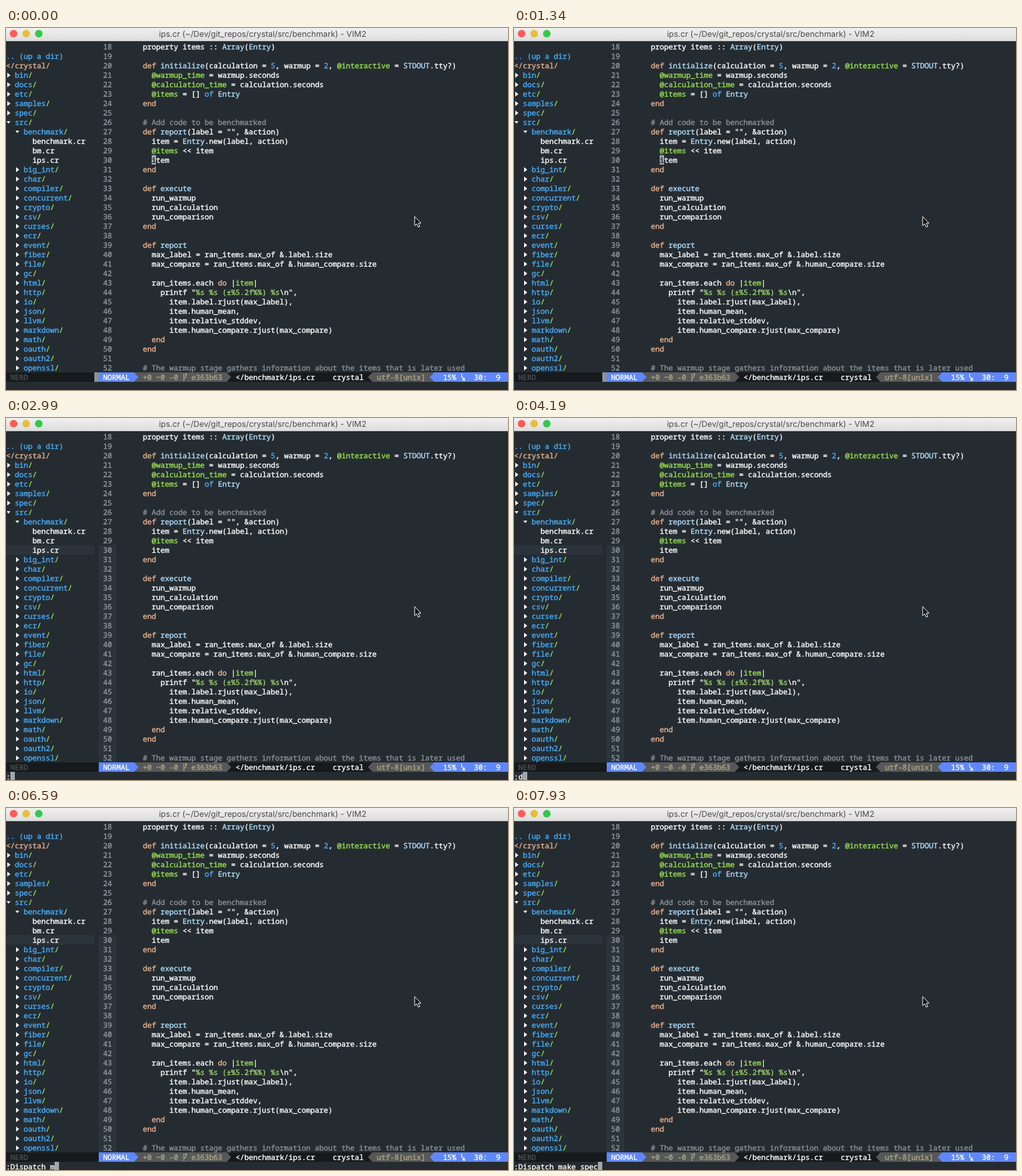
Animation, 796 px wide and 575 px high, one loop 8 s. Source, as an HTML page:

```html
<!DOCTYPE html>
<html lang="en">
<head>
<meta charset="utf-8">
<title>Editor session</title>
<style>
html, body { margin: 0; width: 100%; height: 100%; overflow: hidden; background: #252c31; }
svg { display: block; }
text { white-space: pre; text-rendering: geometricPrecision; }
.m { font: 11.6667px "Noto Sans Mono", monospace; stroke-width: .4; }
.t { font: 12.8px Inter, sans-serif; }
</style>
</head>
<body>
<svg id="stage" width="796" height="575" viewBox="0 0 796 575">
  <defs>
    <linearGradient id="bar" x1="0" y1="0" x2="0" y2="1">
      <stop offset="0" stop-color="#f0f0f0"/>
      <stop offset="1" stop-color="#dcdcdc"/>
    </linearGradient>
  </defs>
</svg>
<script>
const NS = 'http://www.w3.org/2000/svg';
const stage = document.getElementById('stage');
const CW = 7, RH = 15, LOOP = 8000;
const BG = '#252c31', WHITE = '#fcfcfc', BLUE = '#5f87ff', GREY = '#585858', BLACK = '#171a1c';
const INK = {
  w: WHITE, p: '#e8b08c', f: '#b0dcfa', g: '#98e04f', n: '#45adfa',
  c: '#8a8f92', s: '#9cd06f', l: '#8f999f', y: '#aaa684', d: '#4b4f51'
};

function add(tag, attrs, parent = stage) {
  const el = document.createElementNS(NS, tag);
  for (const k in attrs) el.setAttribute(k, attrs[k]);
  return parent.appendChild(el);
}
const rect = (x, y, width, height, fill) => add('rect', { x, y, width, height, fill });
const shape = (d, fill) => add('path', { d, fill });
const rowTop = line => 202 + (line - 30) * RH;

// The thin stroke in the text colour gives the slightly heavy terminal look.
function put(col, line, str, ink = WHITE) {
  const el = add('text', { x: col * CW, y: rowTop(line) + 12, fill: ink, stroke: ink, class: 'm' });
  el.textContent = str;
  return el;
}

// Coloured runs are written {k text}, where k is a key of INK.
function rich(col, line, str) {
  for (const m of str.matchAll(/\{(\w) ([^}]*)\}|[^{]+/g)) {
    const run = m[1] ? m[2] : m[0];
    if (run.trim()) put(col, line, run, INK[m[1] || 'w']);
    col += run.length;
  }
}

// Title bar
rect(0, 0, 796, 575, BG);
rect(0, 0, 796, 21, 'url(#bar)');
rect(0, 20, 796, 1, '#c4c4c4');
['#fc5b57', '#e5bf3c', '#34c84a'].forEach((fill, i) =>
  add('circle', { cx: 12 + i * 20, cy: 9, r: 6, fill }));
add('text', { x: 407, y: 14, 'text-anchor': 'middle', fill: '#4a4a4a', class: 't' })
  .textContent = 'ips.cr (~/Dev/git_repos/crystal/src/benchmark) - VIM2';

// Shading shown while the command line is active
const shade = add('g', { fill: '#2b343a' });
add('rect', { x: 0, y: 202, width: 140, height: 15 }, shade);
add('rect', { x: 147, y: 202, width: 28, height: 345 }, shade);

// File tree
function dir(col, line, name, open) {
  const x = col * CW, y = rowTop(line) + 8;
  shape(open ? `M${x + 1} ${y - 2}h6l-3 4z` : `M${x + 2} ${y - 4}v8l5 -4z`, WHITE);
  rich(col + 2, line, `{n ${name}}{g /}`);
}
rich(0, 19, '{n .. (up a dir)}');
rich(0, 20, '{p </crystal/}');
'bin docs etc samples spec src'.split(' ').forEach((s, i) => dir(0, 21 + i, s, s === 'src'));
dir(2, 27, 'benchmark', true);
['benchmark.cr', 'bm.cr', 'ips.cr'].forEach((s, i) => put(6, 28 + i, s));
('big_int char compiler concurrent crypto csv curses ecr event fiber file gc html http ' +
 'io json llvm markdown math oauth oauth2 openssl')
  .split(' ').forEach((s, i) => dir(2, 31 + i, s));

// Code, first line is 18
const code = `property items :: {f Array}({f Entry})

{p def} {f initialize}(calculation = {n 5}, warmup = {n 2}, {g @interactive} = {f STDOUT}.tty?)
  {g @warmup_time} = warmup.seconds
  {g @calculation_time} = calculation.seconds
  {g @items} = [] {n of} {f Entry}
{p end}

{c # Add code to be benchmarked}
{p def} {f report}(label = "", &action)
  item = {f Entry}.new(label, action)
  {g @items} << item
  item
{p end}

{p def} {f execute}
  run_warmup
  run_calculation
  run_comparison
{p end}

{p def} {f report}
  max_label = ran_items.max_of &.label.size
  max_compare = ran_items.max_of &.human_compare.size

  ran_items.each {p do} |{g item}|
    printf "{s %s %s (±%5.2f%%) %s}\\n",
      item.label.rjust(max_label),
      item.human_mean,
      item.relative_stddev,
      item.human_compare.rjust(max_compare)
  {p end}
{p end}

{c # The warmup stage gathers information about the items that is later used}`;
code.split('\n').forEach((s, i) => {
  put(22, 18 + i, String(18 + i), INK.l);
  rich(31, 18 + i, s);
});

// Status line
const SY = 547, BAR = 53;
const right = (x, ink) => shape(`M${x} ${SY}l7 7.5l-7 7.5z`, ink);
const left = (x, ink) => shape(`M${x + 7} ${SY}l-7 7.5l7 7.5z`, ink);
rect(0, SY, 796, 15, BLACK);
const divider = rect(140, SY, CW, 15, '#8a9299');
rect(147, SY, 56, 15, BLUE);
rect(203, SY, 147, 15, GREY);
right(203, BLUE);
right(350, GREY);
left(574, GREY);
rect(581, SY, 98, 15, GREY);
left(672, BLUE);
rect(679, SY, 117, 15, BLUE);
put(1, BAR, 'NERD', INK.d);
put(22, BAR, 'NORMAL');
put(31, BAR, '+0 ~0 -0', INK.y);
add('path', {
  d: 'M282 549v12M282 557l3.5 -3v-4M284 551l1.5 -2l1.5 2',
  fill: 'none', stroke: INK.y, 'stroke-width': 1.3
});
put(42, BAR, 'e363b63', INK.y);
put(52, BAR, '</benchmark/ips.cr');
put(74, BAR, 'crystal');
put(84, BAR, 'utf-8[unix]', INK.y);
const percent = put(99, BAR, '');
add('path', {
  d: 'M722.5 549v5.5h2.5M724.5 560.5v-5l2.5 5v-5',
  fill: 'none', stroke: WHITE, 'stroke-width': 1.2
});
const lineNo = put(106, BAR, '');
const colNo = put(111, BAR, '');

// Command line and cursor
const cmd = put(0, 54, '');
const block = rect(0, 0, CW, RH, '#a0a8ab');
const under = put(0, 30, '', BG);

// Mouse pointer
add('path', {
  d: 'M648 299.5v14.5l3.3 -3l2.4 5.3l2.5 -1.1l-2.4 -5.2h4.2z',
  fill: '#101214', stroke: '#fff', 'stroke-linejoin': 'round'
});

// [start ms, line, column, character under cursor]; line 0 hides the cursor
const moves = [
  [0, 30, 9, 'i'], [300, 0, 9, ''], [600, 30, 9, 'i'], [890, 31, 9, 'd'],
  [1340, 30, 9, 'i'], [1790, 31, 9, 'd'], [2090, 32, 1, ''], [2390, 30, 9, 'i']
];
const FULL = ':Dispatch make spec';
// [start ms, typed length]
const typing = [
  [2990, 1], [4190, 2], [4340, 3], [4490, 5], [4640, 6], [5390, 9], [5990, 10],
  [6590, 11], [6740, 13], [6890, 14], [7190, 15], [7340, 16], [7490, 18], [7930, 19]
];
const at = (list, t) => list.filter(e => e[0] <= t).pop();
const show = (el, on) => el.setAttribute('visibility', on ? 'visible' : 'hidden');

function draw(t) {
  const typed = at(typing, t);
  const [, line, col, char] = at(moves, t);
  const len = typed ? typed[1] : 0;
  const cx = typed ? len * CW : (24 + col) * CW;
  const top = rowTop(line || 30);

  // Lower case until the command name is completed
  cmd.textContent = t < 5390 ? FULL.slice(0, len).toLowerCase() : FULL.slice(0, len);
  block.setAttribute('x', cx);
  block.setAttribute('y', typed ? 562 : top);
  show(block, typed ? t < 3740 || t >= 3890 : line > 0);
  under.textContent = typed ? '' : char;
  under.setAttribute('x', cx);
  under.setAttribute('y', top + 12);
  show(shade, typed);
  show(divider, !typed);
  percent.textContent = line === 32 ? '16%' : '15%';
  lineNo.textContent = (line || 30) + ':';
  colNo.textContent = col;
}

// The letter below a hidden cursor is plain text, drawn with its line.
const start = performance.now();
function tick() {
  draw((performance.now() - start) % LOOP);
  requestAnimationFrame(tick);
}
draw(0);
tick();
</script>
</body>
</html>
```
